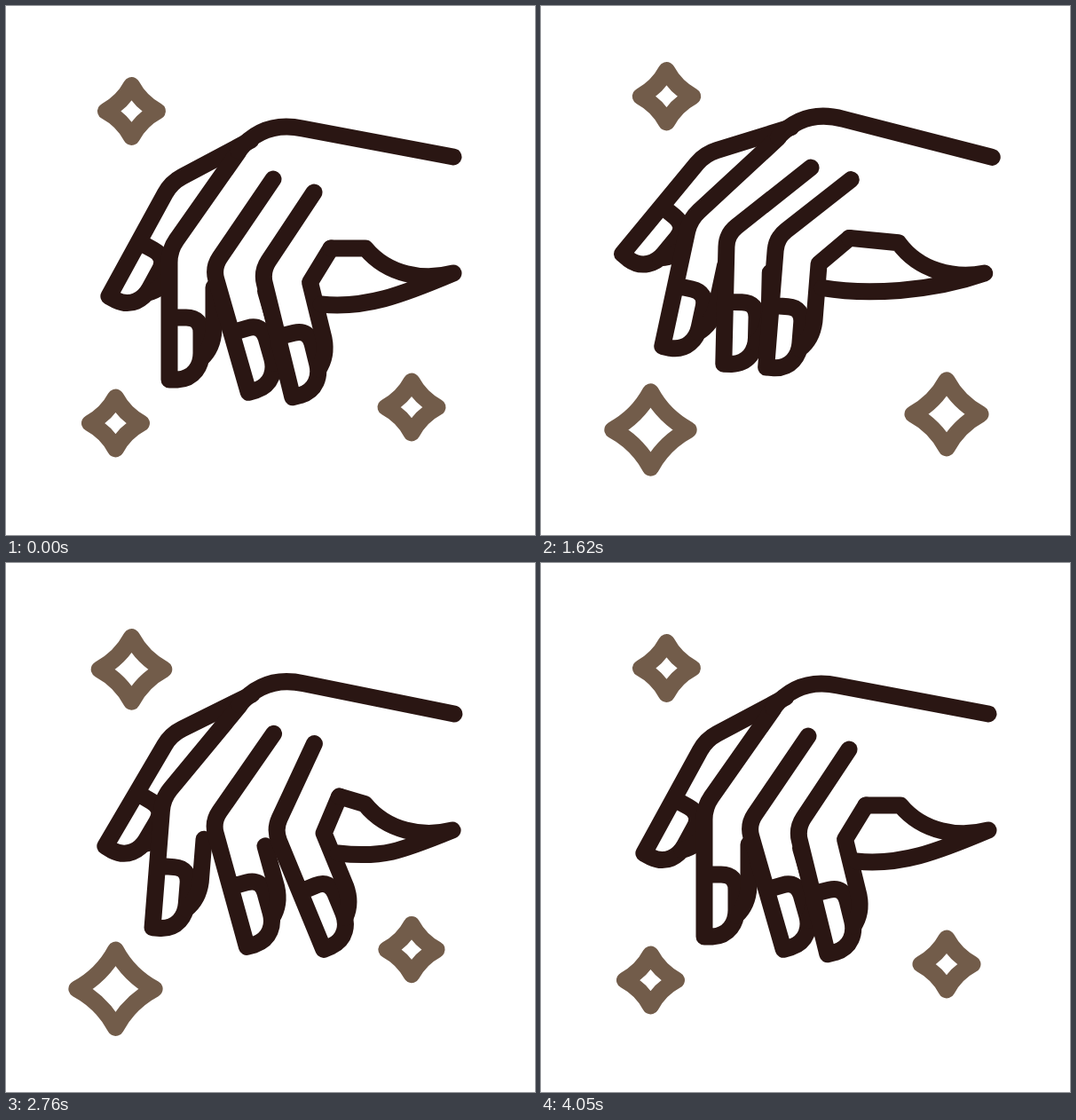
Recreate the animation shown at these times as an HTML page. Size 596 px wide and 596 px high, loop 4500 ms.

```html
<!DOCTYPE html>
<html lang="en">
<head>
<meta charset="utf-8">
<title>Hand with sparkles</title>
<style>
  html, body { margin: 0; width: 100%; height: 100%; overflow: hidden; background: #fff; }
  svg { display: block; width: 596px; height: 596px; }
  path { fill: none; stroke-width: 19; stroke-linecap: round; stroke-linejoin: round; }
  #hand path { stroke: #2a1613; }
  #hand path.skin { fill: #fff; stroke: none; }
  #sparkles path { stroke: #725c4a; }
</style>
</head>
<body>
<svg viewBox="0 0 596 596">
  <g id="sparkles"></g>
  <g id="hand">
    <g id="fingers"></g>
    <path d="M504 170 L334 138 C310 133 284 136 262 163"/>
    <path id="thumb"/>
  </g>
</svg>
<script>
const LOOP = 4500, START = 300, MOVE = 3750;
const WRIST = [500, 235];

// swing: first peak, trough and second peak, as offsets from rest
const wrist = { lag: 80, swing: [6.3, -3.6, 3.6] };

// base: pivot, bend: middle joint, tilt: direction of the fingertip
const fingers = [
  { base: [276, 151], bend: [186, 199], tilt: 28.7, lag: 0, swing: [22, -9, 6.5] },
  { base: [262, 164], bend: [184, 275], tilt: 0, lag: 80, swing: [18.5, -6, 11.3] },
  { base: [301, 195], bend: [233, 295], tilt: -16, lag: 250, swing: [20.2, -8.9, 15.5] },
  { base: [347, 210], bend: [288, 299], tilt: -13.8, lag: 400, swing: [19, -14, 17.4] }
];
const last = fingers[3];
const LIFT = 5;

const sparkles = [
  { x: 141.5, y: 118.5, lag: 190, swing: [-23.5, 23, -23], grow: [-2.5, 16, -2.5] },
  { x: 123.5, y: 470, lag: 0, swing: [23.5, -21, 23.5], grow: [20.5, 1.5, 20.5] },
  { x: 457, y: 452, lag: -220, swing: [-25, 23.5, -23], grow: [-3.5, 15, -3.5] }
];

// Four beats from rest to rest; the lag is widest at the trough
const beat = (n, lag) => START + MOVE * n / 4 + lag * Math.sin(Math.PI * (0.1 + 0.225 * n)) ** 2;

function sway(t, lag, swing) {
  const stops = [0, ...swing, 0];
  let n = 0;
  while (n < 3 && t > beat(n + 1, lag)) n++;
  const from = beat(n, lag), to = beat(n + 1, lag);
  const u = Math.min(1, Math.max(0, (t - from) / (to - from)));
  return stops[n] + (stops[n + 1] - stops[n]) * (1 - Math.cos(Math.PI * u)) / 2;
}

const turn = ([x, y], deg, [cx, cy] = [0, 0]) => {
  const a = deg * Math.PI / 180, c = Math.cos(a), s = Math.sin(a);
  return [cx + (x - cx) * c - (y - cy) * s, cy + (x - cx) * s + (y - cy) * c];
};

const node = (parent, tag, attrs = {}) => {
  const el = document.createElementNS('http://www.w3.org/2000/svg', tag);
  for (const name in attrs) el.setAttribute(name, attrs[name]);
  return parent.appendChild(el);
};

const $ = id => document.getElementById(id);
const knuckle = f => [f.base[0] + 19, f.base[1] + 63];

function buildFinger(f) {
  const { base, bend, tilt } = f;
  // Fingertip coordinates: u across, v along
  const at = (u, v) => {
    const [x, y] = turn([u, v], tilt);
    return `${bend[0] + x} ${bend[1] + y}`;
  };
  const len = Math.hypot(base[0] - bend[0], base[1] - bend[1]);
  const round = bend.map((v, n) => v + (base[n] - v) * 14 / len);
  const side = f === last ? `M${knuckle(f)} L${at(50, 25)}` : `M${at(50, 42)}`;

  f.el = node($('fingers'), 'g');
  node(f.el, 'path', {
    class: 'skin',
    d: `M${base} L${bend} L${at(0, 146)} L${at(28, 140)} L${at(50, 90)} L${at(50, 25)} L${knuckle(f)} Z`
  });
  node(f.el, 'path', {
    d: `M${base} L${round} Q${bend} ${at(0, 14)} L${at(0, 146)} L${at(9, 146)}
      C${at(28, 145)} ${at(36, 130)} ${at(36, 116)} L${at(36, 93)}
      C${at(36, 83)} ${at(31, 76)} ${at(19, 76)} L${at(0, 76)}`
  });
  node(f.el, 'path', { d: `${side} L${at(50, 90)} Q${at(49, 110)} ${at(36, 122)}` });
}

fingers.forEach(buildFinger);
for (const s of sparkles) s.el = node($('sparkles'), 'path');

function draw(t) {
  const tilt = sway(t, wrist.lag, wrist.swing);
  $('hand').setAttribute('transform', `rotate(${tilt} ${WRIST})`);

  const p = Math.min(1, Math.max(0, (t - START) / MOVE));
  const lift = LIFT * Math.sin(Math.PI * p);
  for (const f of fingers) {
    f.angle = sway(t, f.lag, f.swing) - tilt;
    f.el.setAttribute('transform', `translate(0 ${f === last ? -lift : 0}) rotate(${f.angle} ${f.base})`);
  }

  // The thumb stays joined to the last finger
  const joint = point => {
    const [x, y] = turn(point, last.angle, last.base);
    return [x, y - lift];
  };
  const low = joint([355, 336]);
  $('thumb').setAttribute('d', `M${joint(knuckle(last))} L405 273 C430 303 470 310 504 301
    C445 326 ${low[0] + 50} ${low[1] + 5} ${low}`);

  for (const s of sparkles) {
    const y = s.y + sway(t, s.lag, s.swing);
    const r = 29 + sway(t, s.lag, s.grow), k = r * 0.35;
    s.el.setAttribute('d', `M0 ${-r} Q${k} ${-k} ${r} 0 Q${k} ${k} 0 ${r} Q${-k} ${k} ${-r} 0 Q${-k} ${-k} 0 ${-r} Z`);
    s.el.setAttribute('transform', `translate(${s.x} ${y})`);
  }
}

function tick() {
  draw(performance.now() % LOOP);
  requestAnimationFrame(tick);
}
tick();
</script>
</body>
</html>
```
